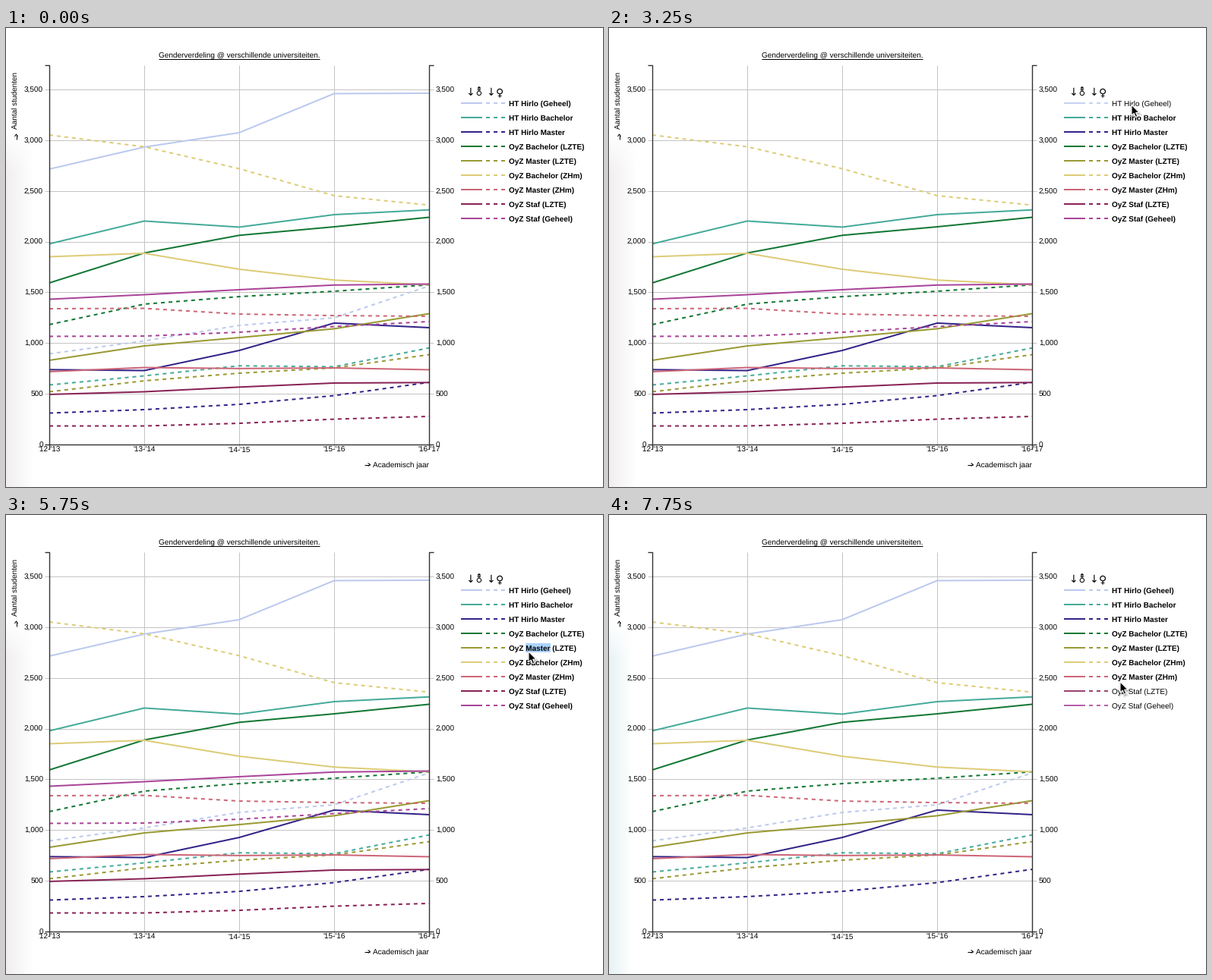
Recreate the animation shown at these times as a matplotlib script. Size 786 px wide and 605 px high, loop 8 s.

```python
import numpy as np
import matplotlib.pyplot as plt
from matplotlib.animation import FuncAnimation
from matplotlib.patches import Polygon, Rectangle

W, H = 786, 605
PX = 0.72  # points per pixel at 100 dpi
STEP, LOOP = 250, 8000
LEFT, RIGHT, TOP, BOTTOM = 57, 557, 49, 549
YEARS = np.linspace(LEFT, RIGHT, 5)

# label, colour, men per year, women per year
SERIES = [
    ("HT Hirlo (Geheel)", "#bbc9ee",
     (2715, 2932, 3074, 3459, 3463), (894, 1021, 1174, 1249, 1563)),
    ("HT Hirlo Bachelor", "#44aa99",
     (1978, 2203, 2143, 2266, 2313), (587, 677, 776, 767, 952)),
    ("HT Hirlo Master", "#332288",
     (738, 729, 927, 1197, 1152), (310, 344, 396, 482, 613)),
    ("OyZ Bachelor (LZTE)", "#117733",
     (1593, 1888, 2062, 2146, 2240), (1182, 1384, 1458, 1511, 1574)),
    ("OyZ Master (LZTE)", "#999933",
     (830, 972, 1054, 1141, 1290), (520, 628, 703, 755, 886)),
    ("OyZ Bachelor (ZHm)", "#ddcc77",
     (1851, 1885, 1728, 1621, 1574), (3051, 2935, 2719, 2453, 2360)),
    ("OyZ Master (ZHm)", "#cc6677",
     (718, 759, 749, 755, 737), (1339, 1342, 1286, 1271, 1264)),
    ("OyZ Staf (LZTE)", "#882255",
     (494, 520, 566, 606, 611), (183, 183, 209, 250, 277)),
    ("OyZ Staf (Geheel)", "#aa4499",
     (1432, 1477, 1526, 1572, 1582), (1066, 1069, 1107, 1163, 1212)),
]

# series row -> time span (ms) in which it is switched off
HIDDEN = {0: (3250, 3750), 4: (5250, 5750), 7: (7250, LOOP), 8: (6500, LOOP)}
# row, left, width, time span of a selected word
SELECTIONS = [(0, 678, 23, (3750, 5000)), (4, 684, 32.5, (5750, 6250))]
TINT_CHANGE = 7500
CURSOR_START = 750
CURSOR_PATH = np.array([
    (750, 698, 118), (1000, 645, 104), (1250, 580, 89), (1500, 531, 82),
    (1750, 498, 119), (2000, 530, 120), (2250, 602, 116), (2500, 668, 107),
    (2750, 688, 101), (4250, 688, 102), (4500, 689, 117), (4750, 689, 154),
    (5000, 688, 179), (5750, 688, 180), (6000, 686, 199), (6250, 682, 239),
    (6500, 680, 253), (6750, 680, 249), (7000, 678, 238), (7250, 676, 233),
    (7750, 673, 220),
])
ARROW = np.array([(0, 0), (0, 14), (3.2, 11), (5.4, 16.2), (7.8, 15.2),
                  (5.6, 10.2), (10, 10)])

plt.rcParams["text.hinting"] = "none"
fig = plt.figure(figsize=(W / 100, H / 100), dpi=100, facecolor="white")
ax = fig.add_axes([0, 0, 1, 1])


def to_y(count):
    return BOTTOM - np.asarray(count) * 468 / 3500


def line(xs, ys, color="black", width=1.0, dashed=False, z=2):
    style = (0, (5 / width * 1.0, 5 / width * 1.0)) if dashed else "-"
    return ax.plot(xs, ys, color=color, lw=width * PX, ls=style, zorder=z,
                   solid_capstyle="butt", dash_capstyle="butt")[0]


def label(x, y, text, size=10, family="Liberation Sans", **kw):
    """Text whose digits and capitals are centred on y."""
    kw = {"va": "baseline", "color": "black", "zorder": 6, **kw}
    return ax.text(x, y + 3.6, text, fontsize=size * PX, family=family, **kw)


def side_glow(color, reach):
    x, y = np.meshgrid(np.arange(50) + 0.5, np.arange(130, H) + 0.5)
    image = np.empty(x.shape + (4,))
    image[..., :3] = np.array(color) / 255
    image[..., 3] = np.clip(1 - x / reach, 0, 1) * np.clip((y - 140) / 50, 0, 1)
    return ax.imshow(image, extent=(0, 50, H, 130), aspect="auto", zorder=0)


def draw_axes():
    for x, year in zip(YEARS, range(12, 17)):
        line([x, x], [TOP, 555], "#c4c4c4", z=1)
        label(x, 555.5, f"'{year}-'{year + 1}", ha="center")
    for count in range(0, 3501, 500):
        y = to_y(count)
        line([51, 563], [y, y], "#c4c4c4", z=1)
        label(49, y, f"{count:,}", ha="right")
        label(566, y, f"{count:,}")
    for x, tick in ((LEFT, 51), (RIGHT, 563)):
        line([tick, x, x, tick], [TOP, TOP, BOTTOM, BOTTOM], "#333333", 1.4, z=5)
    line([LEFT, LEFT, RIGHT, RIGHT], [555, BOTTOM, BOTTOM, 555],
         "#333333", 1.4, z=5)


def draw_titles():
    label(307, 35.5, "Genderverdeling @ verschillende universiteiten.", ha="center")
    line([201, 413], [40.5, 40.5])
    label(557, 575.5, "Academisch jaar", ha="right")
    line([472, 479], [575.5, 575.5])
    line([476.5, 479.5, 476.5], [573.5, 575.5, 577.5])
    label(17, 54.4, "Aantal studenten", rotation=90, ha="right", va="top")
    line([13.5, 13.5], [147, 140.5])
    line([11.5, 13.5, 15.5], [143, 140, 143])
    for x, sign in ((611.5, "↓"), (622.5, "⚨"), (638, "↓"), (650, "♀")):
        label(x, 85.5, sign, 14, "DejaVu Sans", ha="center")


def draw_series(row, name, color, men, women):
    y = 99 + 19 * row
    curves = [line(YEARS, to_y(men), color, 2, z=3),
              line(YEARS, to_y(women), color, 2, dashed=True, z=3)]
    keys = [line([599, 627], [y, y], color, 2),
            line([632, 657.5], [y, y], color, 2, dashed=True)]
    for dashed in (curves[1], keys[1]):
        dashed.set_linestyle((0, (5 * PX / (2 * PX), 5 * PX / (2 * PX))))
    return curves, keys, label(662, y, name, weight="bold")


glows = [side_glow((241, 238, 238), 36), side_glow((231, 241, 245), 30)]
draw_axes()
draw_titles()
rows = [draw_series(i, *entry) for i, entry in enumerate(SERIES)]
marks = [ax.add_patch(Rectangle((x, 93 + 19 * row), width, 12, color="#a9d3fc",
                                lw=0, zorder=4))
         for row, x, width, _ in SELECTIONS]
shadows = [ax.add_patch(Polygon(ARROW, fc="black", ec="black", lw=w, alpha=0.07,
                                zorder=8)) for w in (0.5, 2, 3.5)]
pointer = ax.add_patch(Polygon(ARROW, fc="black", ec="white", lw=1.1 * PX,
                               joinstyle="miter", zorder=9))
ax.set_xlim(0, W)
ax.set_ylim(H, 0)
ax.axis("off")


def during(t, span):
    return span[0] <= t < span[1]


def update(frame):
    t = frame * STEP
    for row, (curves, keys, text) in enumerate(rows):
        shown = not during(t, HIDDEN.get(row, (0, 0)))
        for curve in curves:
            curve.set_visible(shown)
        for key in keys:
            key.set_alpha(1 if shown else 0.85)
        text.set_fontweight("bold" if shown else "normal")
    for mark, (*_, span) in zip(marks, SELECTIONS):
        mark.set_visible(during(t, span))
    glows[0].set_visible(t < TINT_CHANGE)
    glows[1].set_visible(t >= TINT_CHANGE)

    times, xs, ys = CURSOR_PATH.T
    tip = np.array([np.interp(t, times, xs), np.interp(t, times, ys)])
    pointer.set_xy(ARROW + tip)
    for shadow in shadows:
        shadow.set_xy(ARROW + tip + (0.5, 2))
    for part in (pointer, *shadows):
        part.set_visible(t >= CURSOR_START)
    return []


anim = FuncAnimation(fig, update, frames=LOOP // STEP, interval=STEP,
                     init_func=lambda: update(0), repeat=True, repeat_delay=0)
plt.show()
```
